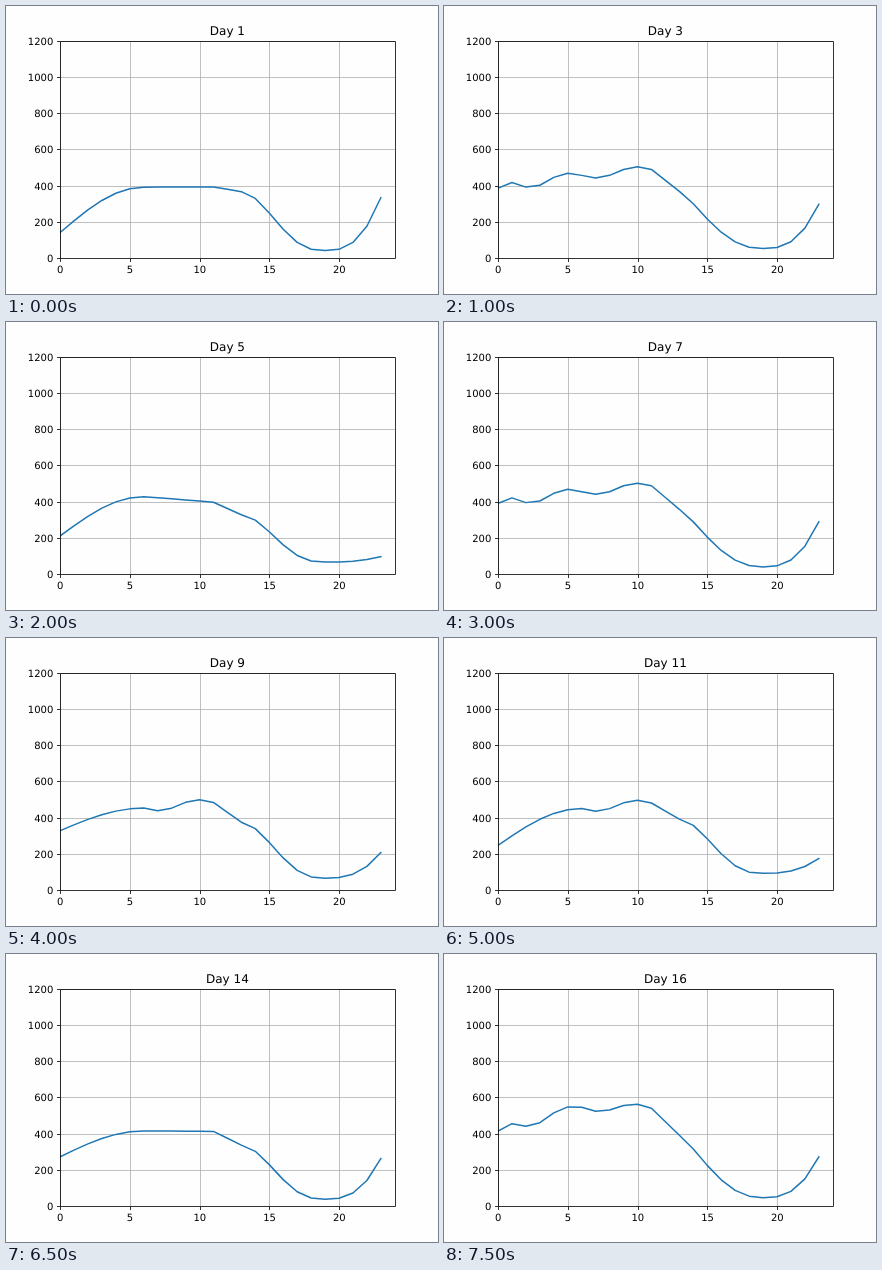
Animation of 432 by 288 pixels, one loop 8000 ms. Source, as an HTML page:

```html
<!DOCTYPE html>
<html lang="en">
<head>
<meta charset="utf-8">
<title>Hourly values by day</title>
<style>
  html, body { margin: 0; width: 100%; height: 100%; overflow: hidden; background: #fefefe; }
  svg { display: block; width: 432px; height: 288px; }
  text { font: 10px "DejaVu Sans", Verdana, sans-serif; fill: #000; text-rendering: geometricPrecision; }
  #title { font-size: 12px; text-anchor: middle; }
  .x { text-anchor: middle; }
  .y { text-anchor: end; }
  path { fill: none; stroke: #000; stroke-width: .8; }
  #grid { stroke: #b0b0b0; }
  #curve { stroke: #1f77b4; stroke-width: 1.5; stroke-linejoin: round; stroke-linecap: square; }
</style>
</head>
<body>
<svg viewBox="0 0 432 288">
  <clipPath id="plot"><rect x="54" y="35" width="335" height="217"/></clipPath>
  <path id="grid" clip-path="url(#plot)"/>
  <path id="curve" clip-path="url(#plot)"/>
  <path id="ticks"/>
  <path d="M54.5 35.5H389.5V252.5H54.5Z"/>
  <g id="labels"></g>
  <text id="title" x="221.4" y="29"></text>
</svg>
<script>
const DAY_MS = 500, DAYS = 16, OVERNIGHT_RISE = 80;
const $ = id => document.getElementById(id);
const px = hour => 54 + 13.95 * hour;
const py = value => 252 - 0.1812 * value;
const snap = v => Math.floor(v + 0.501) + 0.5;
const lerp = (a, b, t) => a + (b - a) * t;

// Key points of a day, at hours 0, 6, 11, 13, 19 and 23
const day = (start, morning, noon, dusk, low, end) => ({ start, morning, noon, dusk, low, end });
const days = {
  1: day(140, 391, 392, 366, 41, 333),
  3: day(385, 456, 489, 368, 52, 297),
  5: day(210, 427, 396, 327, 66, 96),
  7: day(390, 454, 487, 357, 39, 288),
  11: day(246, 450, 480, 391, 92, 174),
  13: day(140, 349, 348, 309, 33, 191),
  16: day(413, 545, 539, 390, 46, 271)
};

// Days in between lead from one known day to the next
function fillGap(first, last) {
  const a = days[first], b = days[last], count = last - first - 1;
  const midnight = i => lerp(a.end, b.start - OVERNIGHT_RISE, i / count);
  for (let i = 1; i <= count; i++) {
    const mid = key => lerp(a[key], b[key], i / (count + 1));
    days[first + i] = day(midnight(i - 1) + OVERNIGHT_RISE,
      mid("morning"), mid("noon"), mid("dusk"), mid("low"), midnight(i));
  }
}
Object.keys(days).map(Number).forEach((d, i, known) => i && fillGap(known[i - 1], d));

function valueAt(hour, d) {
  const busy = d.start > 350;
  if (hour < 6) {
    const t = hour / 6;
    return busy
      ? lerp(d.start, d.morning, t) + 25 * Math.sin(3 * Math.PI * t ** 0.8)
      : lerp(d.start, d.morning, Math.sin(Math.PI / 2 * t));
  }
  if (hour < 11) {
    const t = (hour - 6) / 5;
    const wave = d.noon > 450 ? 22 : 0;
    return lerp(d.morning, d.noon, t) - wave * Math.sin(2 * Math.PI * t);
  }
  if (hour < 13) return lerp(d.noon, d.dusk, (hour - 11) / 2);
  if (hour < 19) {
    const t = (hour - 13) / 6;
    const fall = busy ? (1 - t ** 1.3) ** 2.4 : (1 - t ** 1.8) ** 3;
    return lerp(d.low, d.dusk, fall);
  }
  return lerp(d.low, d.end, ((hour - 19) / 4) ** 2.7);
}

function curvePath(d) {
  const points = Array.from({ length: 24 }, (_, h) =>
    px(h).toFixed(2) + " " + py(valueAt(h, d)).toFixed(2));
  return "M" + points.join("L");
}
const curves = Array.from({ length: DAYS }, (_, i) => curvePath(days[i + 1]));

function label(kind, x, y, text) {
  const node = document.createElementNS("http://www.w3.org/2000/svg", "text");
  node.setAttribute("class", kind);
  node.setAttribute("x", x);
  node.setAttribute("y", y);
  node.textContent = text;
  $("labels").append(node);
}

let grid = "", ticks = "";
for (let hour = 0; hour <= 20; hour += 5) {
  const x = snap(px(hour));
  grid += `M${x} 35V252`;
  ticks += `M${x} 252.5v3.5`;
  label("x", px(hour) + 0.3, 267, hour);
}
for (let value = 0; value <= 1200; value += 200) {
  const y = snap(py(value));
  grid += `M54 ${y}H389`;
  ticks += `M54.5 ${y}h-3.5`;
  label("y", 47.3, y + 3.5, value);
}
$("grid").setAttribute("d", grid);
$("ticks").setAttribute("d", ticks);

const start = performance.now();
let shown = -1;
function loop() {
  const i = Math.floor((performance.now() - start) / DAY_MS) % DAYS;
  if (i !== shown) {
    shown = i;
    $("curve").setAttribute("d", curves[i]);
    $("title").textContent = "Day " + (i + 1);
  }
  requestAnimationFrame(loop);
}
loop();
</script>
</body>
</html>
```
